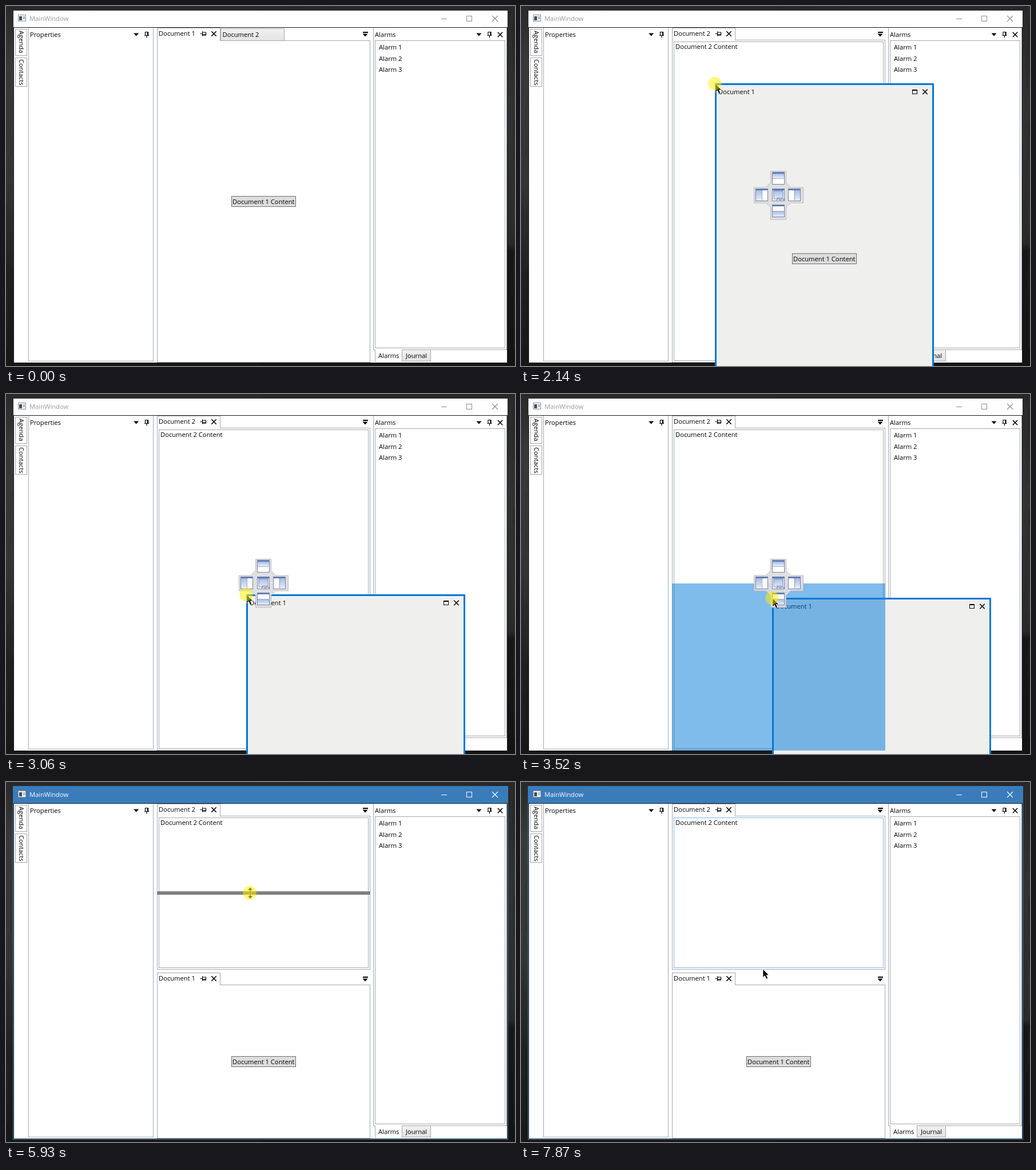
Animation, 890 px wide and 629 px high, one loop 8000 ms. Source, as an HTML page:

```html
<!DOCTYPE html>
<html lang="en">
<head>
<meta charset="utf-8">
<title>Docking layout</title>
<style>
html, body { margin: 0; width: 100%; height: 100%; overflow: hidden; background: #222; }
svg { display: block; width: 890px; height: 629px; }
text { font: 11.2px "Open Sans", "Noto Sans", sans-serif; white-space: pre; }
.crisp { shape-rendering: crispEdges; }
</style>
</head>
<body>
<svg id="stage" viewBox="0 0 890 629" xmlns="http://www.w3.org/2000/svg"></svg>
<script>
const LOOP = 8000;
const LINE = '#a5a7ac';

// ---- markup helpers ----
const rect = (x, y, w, h, fill, stroke = 'none', extra = '') =>
  `<rect class="crisp" x="${x}" y="${y}" width="${w}" height="${h}" fill="${fill}" stroke="${stroke}" ${extra}/>`;
const path = (d, stroke = LINE, fill = 'none', extra = '') =>
  `<path d="${d}" stroke="${stroke}" fill="${fill}" ${extra}/>`;
const edge = (d, stroke = LINE, fill = 'none') => path(d, stroke, fill, 'class="crisp"');
const text = (x, y, s, fill = '#000') => `<text x="${x}" y="${y}" fill="${fill}">${s}</text>`;
const group = (id, body, extra = '') => `<g id="${id}" ${extra}>${body}</g>`;
const at = (x, y, body) => `<g transform="translate(${x} ${y})">${body}</g>`;

// ---- icons, centred on x, y ----
const arrowDown = (x, y) => path(`M${x - 4.5} ${y - 2.5}h9l-4.5 5z`, 'none', '#000');
const cross = (x, y, r = 4.2, color = '#000', w = 1.6) =>
  path(`M${x - r} ${y - r}l${2 * r} ${2 * r}m0 ${-2 * r}l${-2 * r} ${2 * r}`, color, 'none', `stroke-width="${w}"`);
const pinShape = path('M-2.5 1V-4.5H2.5V1M1.5 -4V1M-4 1.5H4M0 1.5V5.5', '#000', 'none', 'stroke-width="1.2"');
const pin = (x, y) => at(x, y, pinShape);
const sidePin = (x, y) => at(x, y, `<g transform="rotate(90)">${pinShape}</g>`);
const tabMenu = (x, y) => rect(x - 4, y - 4, 9, 2, '#000') + arrowDown(x + .5, y + 2);

const button = (x, y) =>
  rect(x + .5, y + .5, 112, 18, '#ddd', '#707070') + text(x + 2, y + 14, 'Document 1 Content');

const sideTab = (y, h, label) =>
  rect(16.5, y + .5, 20, h, '#fff', LINE) +
  `<g transform="translate(22.5 ${y + 3}) rotate(90)">${text(0, 0, label)}</g>`;

function docPane(top, bottom, name, tabH = 20) {
  const y = top + tabH + .5;
  return edge(`M264.5 ${bottom}V${top - .5}H374.5V${y}H636.5V${bottom}Z`, LINE, '#fff') +
    text(267, top + 13, name) + sidePin(345, top + 9.5) + cross(363.5, top + 9.5) + tabMenu(627.5, top + 10);
}

const doc2Box = bottom =>
  rect(267.5, 62.5, 366, bottom - 62.5, '#fff', LINE, 'data-box=""') + text(270, 75, 'Document 2 Content');

// ---- desktop and window frame ----
function desktop() {
  let seed = 7, out = '';
  const rnd = () => (seed = seed * 16807 % 2147483647) / 2147483647;
  const grad = (id, ...stops) => `<linearGradient id="${id}" x2="0" y2="1">` +
    stops.map(([o, c]) => `<stop offset="${o}" stop-color="${c}"/>`).join('') + '</linearGradient>';
  out += '<defs>' +
    grad('woodL', [0, '#292929'], [.15, '#383838'], [.5, '#333'], [.75, '#202020'], [1, '#171717']) +
    grad('woodR', [0, '#282828'], [.3, '#333'], [.66, '#292929'], [.68, '#171717'], [1, '#141414']) +
    grad('paneTop', [0, '#a6bde4'], [1, '#e9f0fa']) +
    grad('tabOff', [0, '#f1f1f1'], [1, '#e4e4e4']) + '</defs>';
  out += rect(0, 0, 890, 629, '#202020') + rect(0, 0, 445, 629, 'url(#woodL)') + rect(445, 0, 445, 629, 'url(#woodR)');
  for (let i = 0; i < 44; i++) {
    const x = (i % 2 ? 0 : 876) + rnd() * 14;
    out += path(`M${x.toFixed(1)} ${(rnd() * 500).toFixed()}v${(40 + rnd() * 130).toFixed()}`,
      rnd() < .5 ? '#000' : '#777', 'none', 'opacity=".1"');
  }
  return out;
}

function titleBar(ink, btn, back, border) {
  return border +
    rect(13, 8, 864, 29, back) +
    rect(21.5, 15.5, 13, 11, '#f4f4f4', '#8c949c') + rect(23, 18, 5, 7, '#444f5c') + rect(30, 18, 3, 5, '#a8b4bc') +
    text(41, 26, 'MainWindow', ink) +
    edge('M761 22.5h10', btn) + edge('M805.5 17.5h9v9h-9z', btn) + cross(855, 22, 5, btn, 1.1);
}

const frame =
  group('idle', titleBar('#929d96', '#8c8c8c', '#fff', '')) +
  group('active', titleBar('#fff', '#fff', '#3a7cba', rect(12, 7, 866, 618, '#3a7cba'))) +
  rect(13, 37, 864, 587, '#1b1b1b') + rect(14, 38, 862, 585, '#fff');

const leftSide =
  sideTab(40, 46, 'Agenda') + sideTab(90, 50, 'Contacts') +
  edge('M39.5 38V620.5H257.5V38') + text(42, 54, 'Properties') + arrowDown(227.7, 50) + pin(246, 50);

const rightSide =
  edge('M642.5 38V600.5H645.5V622M692.5 600.5H875.5V38') +
  rect(645.5, 60.5, 227, 537, '#fff', LINE) +
  text(645, 54, 'Alarms') + arrowDown(827, 50) + pin(845.5, 50) + cross(864, 50) +
  [1, 2, 3].map(i => text(652, Math.round(56.5 + 19.6 * i), 'Alarm ' + i)).join('') +
  rect(692.5, 600.5, 50, 20, 'url(#tabOff)', LINE) + text(651, 615, 'Alarms') + text(699, 615, 'Journal');

// ---- the three document layouts ----
const tabbed = docPane(39, 622.5, 'Document 1', 21) +
  rect(375.5, 39.5, 111, 21, 'url(#tabOff)', LINE) + text(378.5, 54, 'Document 2') + button(394, 332);
const single = docPane(39, 622.5, 'Document 2') + doc2Box(619.5);
const split = docPane(39, 327.5, 'Document 2') + doc2Box(324.5) +
  docPane(334, 622.5, 'Document 1') + button(394, 479);

const floating =
  rect(1.5, 1.5, 380, 588, '#efefee', '#0078d7', 'stroke-width="3"') +
  text(6, 19, 'Document 1') +
  edge('M345.5 11.5h8v7h-8zM345 12.5h9', '#000') + cross(367.5, 15) + button(135, 297);

// ---- drop target ----
function dropButton(x, y, fillBox, divider) {
  return at(x, y, rect(-10.5, -10.5, 21, 21, '#fff', '#7482ad') + rect(-10, -10, 20, 2, '#5f7ab5') +
    rect(...fillBox, 'url(#paneTop)') + path(divider, '#4a5580', 'none', 'stroke-dasharray="1 1"'));
}
const dropCross =
  path('M436.5 288.5h27v20l8 8.500h22v27h-22l-8 8v21h-27v-21l-8-8h-21v-27h21l8-8.500z', '#b8b8bb', '#dedede', 'opacity=".92"') +
  dropButton(450, 301, [-10, -8, 20, 8], 'M-10 .5H10') +
  dropButton(450, 358, [-10, 1, 20, 9], 'M-10 .5H10') +
  dropButton(421, 330, [-10, -8, 10, 18], 'M.5 -8V10') +
  dropButton(478, 330, [0, -8, 10, 18], 'M.5 -8V10') +
  dropButton(450, 330, [-9, -8, 18, 17], 'M-8 -7H8V7H-8ZM-2 9V5H8') +
  rect(447, 337, 5, 3, '#fff', '#7482ad') + rect(454, 337, 5, 3, '#fff', '#7482ad');

// ---- pointers ----
const pointers =
  group('arrow', path('M0 0V14.5L3.3 11.4L6 17.3L8.600 16.1L6 10.4H10.300Z', '#fff', '#000', 'stroke-width=".7"')) +
  group('resize', path('M0 -10L4.500 -5H1V5H4.500L0 10L-4.500 5H-1V-5H-4.500Z', '#fff', '#111', 'stroke-width=".7"')) +
  group('ibeam', path('M-3.500 -8.500H-1L0 -7.500L1 -8.500H3.500M0 -7.500V7.500M-3.500 8.500H-1L0 7.500L1 8.500H3.500', '#000')) +
  group('press', '<circle cx="-1" cy="-.5" r="11.7" fill="#fff000" opacity=".52"/>');

const stage = document.getElementById('stage');
stage.innerHTML = desktop() + frame + leftSide + rightSide +
  group('tabbed', tabbed) + group('single', single) + group('split', split) +
  group('bar', rect(264, -3, 373, 6, '#808080')) +
  group('floating', floating) +
  group('dropLeft', rect(264, 38, 186, 585, '#0078d7', 'none', 'opacity=".5"')) +
  group('dropBottom', rect(264, 331, 373, 292, '#0078d7', 'none', 'opacity=".5"')) +
  group('target', dropCross) +
  group('pointer', pointers);

const el = {};
stage.querySelectorAll('g[id]').forEach(g => el[g.id] = g);
const splitBox = el.split.querySelector('[data-box]');

// ---- motion ----
const linear = p => p;
const smooth = p => p * p * (3 - 2 * p);
const sineOut = p => Math.sin(p * Math.PI / 2);

// first change, last change, number of steps, end point, easing
const moves = [
  [510, 670, 3, 581, 350, linear],
  [970, 1670, 10, 312, 47, smooth],
  [1970, 2450, 7, 382, 272, smooth],
  [2680, 3060, 6, 421, 351, smooth],
  [3140, 3290, 3, 438, 356, sineOut],
  [3520, 3520, 1, 440, 357, linear],
  [4440, 4670, 4, 429, 333, smooth],
  [4990, 5070, 2, 427, 331, linear],
  [5696, 6154, 7, 426.5, 156, sineOut],
  [6230, 6230, 1, 424, 153, linear],
  [6930, 7700, 11, 425, 323, smooth],
  [7870, 7870, 1, 423, 327, linear]
];

function pointerAt(t) {
  let x = 810, y = 742;
  for (const [start, end, steps, toX, toY, ease] of moves) {
    if (t < start) break;
    const k = t >= end ? steps : 1 + Math.floor((t - start) / (end - start) * (steps - 1));
    const p = ease(k / steps);
    x += (toX - x) * p;
    y += (toY - y) * p;
  }
  return [x, y];
}

const show = (id, on) => el[id].style.display = on ? '' : 'none';
const move = (id, x, y) => el[id].setAttribute('transform', `translate(${x} ${y})`);

function draw(t) {
  const within = (a, b) => t >= a && t < b;
  const [x, y] = pointerAt(t);
  const over = (bx, by) => Math.abs(x - bx) < 13.5 && Math.abs(y - by) < 13.5;
  const dragDoc = within(2130, 3830), dragBar = within(5620, 6230);
  const active = within(1970, 2130) || t >= 3900;

  show('active', active);
  show('idle', !active);
  show('tabbed', t < 2130);
  show('single', dragDoc);
  show('split', t >= 3830);
  splitBox.setAttribute('stroke', t >= 6230 ? '#7eb4ea' : LINE);

  show('floating', dragDoc);
  move('floating', Math.round(x) - 1, Math.round(y) - 1);
  show('target', dragDoc);
  show('dropLeft', dragDoc && over(421, 330));
  show('dropBottom', dragDoc && over(450, 359));

  show('bar', dragBar);
  move('bar', 0, Math.round(y));

  const resize = within(4670, 6230), ibeam = within(6230, 7870);
  show('pointer', t >= 510);
  move('pointer', Math.round(x), Math.round(y));
  show('resize', resize);
  show('ibeam', ibeam);
  show('arrow', !resize && !ibeam);
  show('press', within(1970, 3830) || dragBar);
}

const begin = performance.now();
function tick() {
  draw((performance.now() - begin) % LOOP);
  requestAnimationFrame(tick);
}
tick();
</script>
</body>
</html>
```
